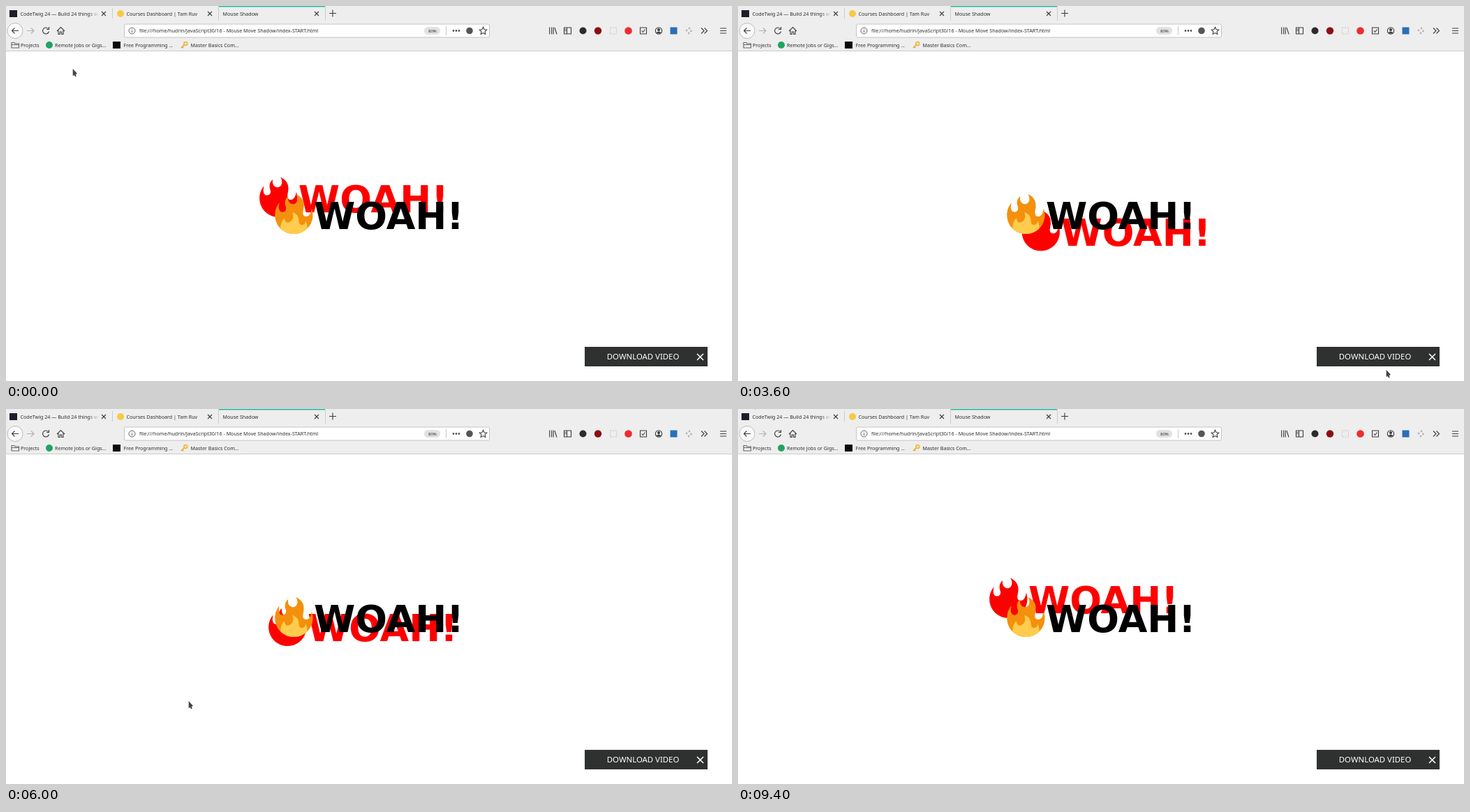
An HTML page that plays this animation: 1040x538 px, repeating every 9.9 s.

```html
<!DOCTYPE html>
<html lang="en">
<head>
<meta charset="utf-8">
<title>Mouse Shadow</title>
<style>
  html, body { margin: 0; width: 100%; height: 100%; overflow: hidden; background: #fff; }
  svg { display: block; width: 1040px; height: 538px; }
  text { font: 7.13px "Noto Sans", sans-serif; fill: #2c2e30; white-space: pre; }
  .big { font: bold 53.8px "DejaVu Sans", sans-serif; fill: inherit; }
  .line { fill: none; stroke: #3c3c3c; stroke-width: 1.1; }
</style>
</head>
<body>
<svg viewBox="0 0 1040 538">
  <defs>
    <linearGradient id="fade" gradientUnits="userSpaceOnUse" x1="118" x2="133" y1="0" y2="0">
      <stop stop-color="#2c2e30"/><stop offset="1" stop-color="#2c2e30" stop-opacity="0"/>
    </linearGradient>
    <path id="flame" transform="translate(383.7 269.6) scale(1.595)" d="M35 19c0-2.062-.367-4.039-1.04-5.868-.46 5.389-3.333 8.157-6.335 6.868-2.812-1.208-.917-5.917-.777-8.164.236-3.809-.012-8.169-6.931-11.794 2.875 5.5.333 8.917-2.333 9.125-2.958.231-5.667-2.542-4.667-7.042-3.238 2.386-3.332 6.402-2.333 9 1.042 2.708-.042 4.958-2.583 5.208-2.84.28-4.418-3.041-2.963-8.333C2.52 10.965 1 14.805 1 19c0 9.389 7.611 17 17 17s17-7.611 17-17z"/>
    <text id="woah" class="big" x="441" y="320">WOAH!</text>
    <path id="close" class="line" d="M-3-3 3 3M3-3-3 3"/>
  </defs>

  <rect width="1040" height="538" fill="#fff"/>

  <!-- headline -->
  <g id="shadow" fill="#f00"><use href="#flame"/><use href="#woah"/></g>
  <use href="#flame" fill="#f4900c"/>
  <path transform="translate(383.7 269.6) scale(1.595)" fill="#ffcc4d" d="M28.394 23.999c.148 3.084-2.561 4.293-4.019 3.709-2.106-.843-1.541-2.291-2.083-5.291s-2.625-5.083-5.708-6c2.25 6.333-1.247 8.667-3.08 9.084-1.872.426-3.753-.001-3.968-4.007C7.352 23.668 6 26.676 6 30c0 .368.023.73.055 1.09C9.125 34.124 13.342 36 18 36s8.875-1.876 11.945-4.91c.032-.36.055-.722.055-1.09 0-2.187-.584-4.236-1.606-6.001z"/>
  <use href="#woah" fill="#000"/>

  <!-- tabs -->
  <rect width="1040" height="64" fill="#eee"/>
  <rect y="64" width="1040" height="1" fill="#ccc"/>
  <rect id="hover" width="152" height="21" fill="#d9d9d9"/>
  <path d="M152.5 3V18M304.5 0V21M457.5 0V21" stroke="#ccc"/>
  <rect x="305" width="152" height="1.4" fill="#1abc9c"/>
  <rect x="5" y="6" width="11" height="10" fill="#1d1d2b"/>
  <text x="20.5" y="13.6" style="fill:url(#fade)">CodeTwig 24 — Build 24 things wi</text>
  <circle cx="164" cy="11" r="5" fill="#f7c948"/>
  <text x="172.5" y="13.6">Courses Dashboard | Tam Ruv</text>
  <text x="310.5" y="13.6">Mouse Shadow</text>
  <use href="#close" x="140" y="11"/><use href="#close" x="292" y="11"/><use href="#close" x="445" y="11"/>
  <path class="line" d="M463 10.5H473M468 5.5V15.5"/>

  <!-- navigation -->
  <circle cx="13" cy="35.5" r="11" fill="#fafafa" stroke="#bbb"/>
  <path class="line" d="M18 35.5H8.5M12.5 31.5 8.5 35.5 12.5 39.5"/>
  <path class="line" style="stroke:#b0b0b0" d="M30 35.5H40M36 31.5 40 35.5 36 39.5"/>
  <path class="line" d="M60.5 32.5A4.5 4.5 0 1 0 61.5 36.5M61.5 30V33.5H58"/>
  <path class="line" d="M73 36 78.5 30.5 84 36M75 35V40.5H77.3V37H79.7V40.5H82V35"/>
  <rect x="169.5" y="26" width="523" height="19" rx="2" fill="#fff" stroke="#c4c4c4"/>
  <path class="line" style="stroke-width:.8" d="M176 35.5a4.5 4.5 0 1 1 9 0a4.5 4.5 0 1 1-9 0M180.5 34.8V38M180.5 32.8V33.7"/>
  <text x="191" y="38.2">file:///home/hudrin/JavaScript30/16 - Mouse Move Shadow/index-START.html</text>
  <rect x="599" y="30" width="23" height="11" rx="5.5" fill="#e1e1e1"/>
  <text x="605" y="37.8" style="font-size:6px">80%</text>
  <path d="M630.5 29V42" stroke="#c8c8c8"/>
  <path d="M641 35.5h0M645 35.5h0M649 35.5h0" stroke="#555" stroke-width="2.8" stroke-linecap="round"/>
  <circle cx="664" cy="35.5" r="4.8" fill="#555"/>
  <path class="line" d="M683.5 30.3 685.1 33.8 688.8 34.2 686 36.7 686.8 40.5 683.5 38.6 680.2 40.5 681 36.7 678.2 34.2 681.9 33.8Z"/>

  <!-- toolbar buttons -->
  <path class="line" d="M778.7 30.5V40.5M781.7 30.5V40.5M784.2 30.5V40.5M786 31 789 40.5"/>
  <path class="line" d="M799.5 31H809.5V40H799.5ZM803.5 31V40M800.5 33.5H802.5M800.5 35.5H802.5"/>
  <circle cx="826.5" cy="35.5" r="5" fill="#2b2b2b"/>
  <circle cx="848" cy="35.5" r="5.2" fill="#8c0f12"/>
  <rect x="865.5" y="31" width="9" height="9" fill="none" stroke="#c4c4c4" stroke-dasharray="2 1.5"/>
  <circle cx="891.5" cy="35.5" r="5.3" fill="#ef2b2d"/>
  <path class="line" d="M908.5 31H917.5V40H908.5ZM910.7 35.5 912.5 37.5 915.5 33.5"/>
  <circle class="line" cx="935" cy="35.5" r="4.7"/>
  <path fill="#3c3c3c" d="M933 34a2 2 0 1 1 4 0a2 2 0 1 1-4 0M931.7 38.5Q935 34.5 938.3 38.5Q935 40.5 931.7 38.5Z"/>
  <rect x="951.5" y="30.5" width="10" height="10" fill="#2b6fb8"/>
  <path d="M975 35h0M979 32h0M981.5 36h0M978 39h0" stroke="#b4b4b4" stroke-width="2.8" stroke-linecap="round"/>
  <path class="line" d="M996 31.5 1000 35.5 996 39.5M1000.5 31.5 1004.5 35.5 1000.5 39.5"/>
  <path class="line" d="M1023 32H1032M1023 35.5H1032M1023 39H1032"/>

  <!-- bookmarks -->
  <path class="line" style="stroke:#666" d="M8 60V52.5H12L13 54H18.5V60ZM8 55.5H18.5"/>
  <text x="21" y="58.6">Projects</text>
  <circle cx="62" cy="56" r="5" fill="#1fa463"/>
  <text x="70" y="58.6">Remote Jobs or Gigs...</text>
  <rect x="153" y="51" width="11" height="10" fill="#0a0a0a"/>
  <text x="168.5" y="58.6">Free Programming ...</text>
  <path d="M256 55 251 60M252.5 58.5 254.2 60.2" stroke="#e8a92c" stroke-width="1.7"/>
  <circle cx="257.3" cy="54" r="2.4" fill="none" stroke="#f5b83d" stroke-width="1.8"/>
  <text x="264.5" y="58.6">Master Basics Com...</text>

  <!-- download bar -->
  <rect x="829" y="489" width="176" height="28" fill="#2f3030"/>
  <text x="860.8" y="507.3" style="font-size:11.4px;fill:#fff">DOWNLOAD VIDEO</text>
  <path d="M990 499 999 508M999 499 990 508" stroke="#fff" stroke-width="1.5"/>

  <path id="pointer" fill="#444" d="M.7 0V10.2L2.8 8.9 4.2 11.6 5.8 10.8 4.7 8.1 7 6.9Z"/>
</svg>
<script>
const LOOP = 9900, TICK = 100, WALK = 54.17, LAG = 0.25;
const START = [95, 90];

// Strokes of the hand: first tick, last tick, and where the pointer ends up.
const strokes = [
  [5, 8, 220, 216],
  [11, 11, 300, 323],
  [12, 15, 470, 399],
  [17, 20, 844, 388],
  [27, 27, 938, 220],
  [28, 30, 1008, 330],
  [31, 36, 928, 522],
  [37, 38, 745, 436],
  [40, 42, 717, 201],
  [45, 45, 658, 167],
  [46, 47, 430, 208],
  [49, 52, 251, 310],
  [54, 59, 600, 405],
  [60, 60, 261, 419],
  [62, 62, 0, 300],
  [63, 64, 351, 129],
  [66, 69, 550, 170],
  [71, 73, 855, 215],
  [75, 77, 368, 384],
  [79, 79, 155, 247],
  [83, 85, 38, 40],
  [87, 89, 20.5, -11]
];

function pointerAt(tick, lag = 0) {
  let [x, y] = START;
  for (const [first, last, endX, endY] of strokes) {
    if (tick < first) break;
    const count = last - first + 1;
    const progress = (Math.min(tick - first + 1, count) - lag) / count;
    if (tick > last && strokes.some(([next]) => next > last && next <= tick)) {
      [x, y] = [endX, endY];
    } else {
      x += (endX - x) * progress;
      y += (endY - y) * progress;
    }
  }
  return [x, y];
}

// The shadow trails the pointer slightly and only follows it inside the page area.
function shadowAt(tick) {
  const [x, y] = pointerAt(tick, LAG);
  return [
    (Math.max(x, 38) / 1040 - 0.5) * WALK,
    ((Math.max(y, 64) - 64) / 474 - 0.5) * WALK
  ];
}

const [shadow, pointer, hover] = ["shadow", "pointer", "hover"].map(id => document.getElementById(id));
const place = (node, [x, y]) => node.setAttribute("transform", `translate(${x} ${y})`);

function draw(now) {
  const tick = Math.floor((now % LOOP) / TICK);
  const [x, y] = pointerAt(tick);
  place(pointer, [x, y]);
  place(shadow, shadowAt(tick));
  hover.style.display = x < 152 && y >= 0 && y < 21 ? "" : "none";
  requestAnimationFrame(draw);
}
draw(performance.now());
</script>
</body>
</html>
```
